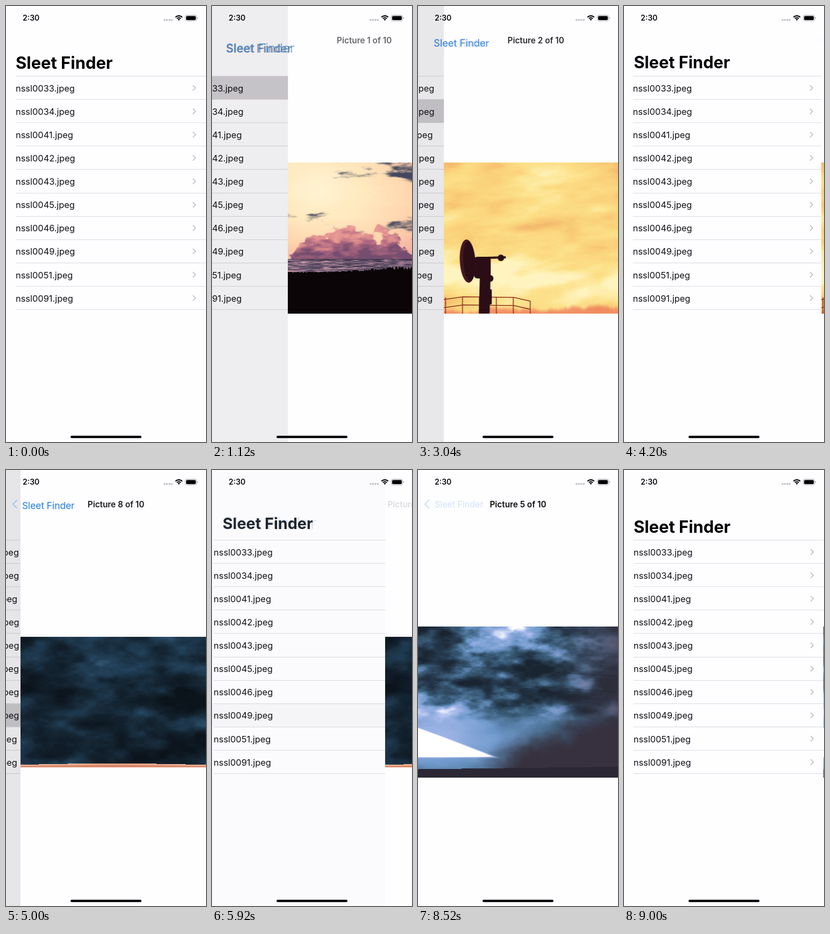
These frames come from a looping animation (372 by 805 pixels, 9040 ms). An HTML page with a canvas:

```html
<!DOCTYPE html>
<html lang="en">
<head>
<meta charset="utf-8">
<title>Picture list</title>
<style>
html, body { margin: 0; width: 100%; height: 100%; overflow: hidden; background: #fefdff; }
canvas { display: block; width: 372px; height: 805px; }
</style>
</head>
<body>
<canvas id="stage"></canvas>
<script>
const W = 372, H = 805, LOOP = 9040, STEP = 40;
const PAPER = '#fefdff', BLUE = '#157bea', APP = 'Sleet Finder';
const FILES = ['0033', '0034', '0041', '0042', '0043', '0045', '0046', '0049', '0051', '0091'];
const ROW_TOP = 129, ROW_H = 43.1;

const stage = document.getElementById('stage');
const scale = window.devicePixelRatio || 1;
stage.width = W * scale;
stage.height = H * scale;
const ctx = stage.getContext('2d');

const mix = (a, b, k) => a + (b - a) * k;
const clamp = v => Math.max(0, Math.min(1, v));
const smooth = v => (v = clamp(v), v * v * (3 - 2 * v));

// ---- fields and colours for the pictures ----
function hash(x, y) {
  const v = Math.sin(x * 127.1 + y * 311.7) * 43758.5453;
  return v - Math.floor(v);
}

function noise(x, y) {
  const i = Math.floor(x), j = Math.floor(y), u = smooth(x - i), v = smooth(y - j);
  return mix(mix(hash(i, j), hash(i + 1, j), u), mix(hash(i, j + 1), hash(i + 1, j + 1), u), v);
}

// Fractal noise around zero, roughly -0.5 to 0.5.
function cloud(x, y) {
  let sum = 0;
  for (let o = 0, size = 1; o < 5; o++, size *= 2) sum += (noise(x * size + o * 17, y * size) - 0.5) / size;
  return sum;
}

const bell = (d, r) => Math.exp(-((d / r) ** 2));
const blend = (a, b, k) => a.map((v, i) => mix(v, b[i], k));
const rgb = hex => [1, 3, 5].map(i => parseInt(hex.slice(i, i + 2), 16));

function ramp(...hexes) {
  const stops = hexes.map(rgb), last = stops.length - 1;
  return k => {
    const at = clamp(k) * last, i = Math.min(Math.floor(at), last - 1);
    return blend(stops[i], stops[i + 1], at - i);
  };
}

function picture(height, shade, details) {
  const image = document.createElement('canvas');
  image.width = W;
  image.height = height;
  const g = image.getContext('2d'), data = g.createImageData(W, height);
  for (let y = 0, n = 0; y < height; y++) {
    for (let x = 0; x < W; x++, n += 4) data.data.set([...shade(x, y), 255], n);
  }
  g.putImageData(data, 0, 0);
  if (details) details(g);
  return { image, height, top: Math.round(428 - height / 2) };
}

function line(g, color, width, points) {
  g.strokeStyle = color;
  g.lineWidth = width;
  g.beginPath();
  points.forEach(p => g.lineTo(...p));
  g.stroke();
}

function rect(g, color, x, y, w, h, radius = 0) {
  g.fillStyle = color;
  g.beginPath();
  g.roundRect(x, y, w, h, radius);
  g.fill();
}

function oval(g, color, x, y, rx, ry) {
  g.fillStyle = color;
  g.beginPath();
  g.ellipse(x, y, rx, ry, -0.06, 0, 7);
  g.fill();
}

// ---- pictures ----
const sunsetSky = ramp('#fff3d2', '#ffe8be', '#ffd2ac', '#f1a6a2', '#a77f9e');
const cumulus = ramp('#f4a99a', '#e0908f', '#a8657e', '#754d6e');
const sea = ramp('#42374c', '#756179', '#d69aa4');
const slate = rgb('#43485f'), land = rgb('#0b0508');

const sunset = picture(279, (x, y) => {
  const grass = 202 - 6 * bell(x - 215, 90) - 8 * noise(x / 2, 3) * bell(x - 230, 120) + x / 90;
  if (y > grass) return land;
  if (y > 177) return sea(0.55 - x / 1500 + 0.9 * cloud(x / 14, y / 1.5) - 0.4 * bell(y - 177, 3));
  let color = sunsetSky(Math.hypot((x - 60) / 360, (y - 50) / 220) + 0.08 * cloud(x / 60, y / 25));
  const dark = bell(x - 290, 85) * bell(y - 16 + (x - 290) / 14, 19);
  color = blend(color, slate, smooth((dark + cloud(x / 50, y / 16) - 0.3) * 2.5));
  const heap = 42 * bell(x - 90, 48) + 26 * bell(x - 178, 30) + 34 * bell(x - 285, 42) + 12 * bell(x - 372, 50);
  const edge = 159 - heap - 42 * cloud(x / 24, y / 20);
  return blend(color, cumulus((y - 118 + x / 12) / 66 + 0.5 * cloud(x / 18, y / 8)), smooth((y - edge) / 7));
});

const goldSky = ramp('#f0ae68', '#fad079', '#fce18a', '#fff4bf');
const ember = rgb('#f0805c');

const dish = picture(279, (x, y) => {
  const corner = bell(x - 320, 80) * bell(y, 45), haze = bell(y - 212, 34);
  const color = goldSky(0.55 + 0.75 * cloud(x / 95, y / 34 + x / 300) + 0.3 * haze - 0.5 * corner);
  return blend(color, ember, 0.8 * smooth((y - 268 + 16 * cloud(x / 40, 1)) / 11));
}, g => {
  const dark = '#2b0d16', rail = '#8f321e';
  for (const drop of [0, 15]) line(g, rail, 1.6, [[0, 253 + drop], [35, 248 + drop], [130, 249 + drop], [161, 256 + drop]]);
  for (let x = 3; x < 165; x += 31.5) line(g, rail, 1.6, [[x, x > 140 ? 256 : 249], [x, 279]]);
  line(g, dark, 20, [[77, 200], [75, 279]]);
  rect(g, dark, 66, 234, 23, 28, 2);
  rect(g, dark, 56, 174, 31, 40, 6);
  line(g, dark, 4, [[80, 176], [115, 175]]);
  oval(g, dark, 106, 176, 6, 6);
  oval(g, dark, 87, 214, 5, 6);
  oval(g, '#431722', 44, 182, 14.5, 40);
  oval(g, dark, 47, 182, 11, 37);
});

const nightSky = ramp('#0b131b', '#142431', '#22415a', '#4b6f93');
const duskStrip = ramp('#f3bfa0', '#d98768');

const night = picture(241, (x, y) => {
  const ground = 236 - 3 * bell(x - 170, 130);
  if (y > ground) return duskStrip((y - ground) / 4);
  return nightSky(0.3 + 0.8 * cloud(x / 75, y / 40) + 0.3 * bell(x - 50, 80) * bell(y - 10, 60) + 0.25 * bell(y - 160, 25));
});

const stormSky = ramp('#1a2531', '#263a4e', '#3d617f', '#7099cb', '#a5b9ea', '#ffffff');
const gloom = rgb('#37313f'), field = rgb('#2b2735');

const storm = picture(279, (x, y) => {
  if (y > 263 - x / 80) return field;
  const texture = cloud(x / 52, y / 26) * (1 - 0.9 * smooth((y - 140) / 50));
  const glow = 0.42 * bell(x - 165, 50) * bell(y - 8, 25) + 0.5 * bell(x, 210) * bell(y - 205, 75);
  const gap = smooth(Math.min(y - 188 - x * 0.37, 240 - y) / 9 + 0.4);
  const color = stormSky(0.28 + 0.75 * texture + glow + gap);
  const slope = (y - 265 + (x - 110) * 0.42) / 60 + 0.5 + 0.4 * cloud(x / 40, y / 30);
  const shadow = Math.max(smooth(slope) * smooth((x - 85) / 110), 0.75 * smooth((x - 220) / 170));
  return blend(color, gloom, shadow * (1 - gap));
}, g => {
  for (const y of [68, 97]) line(g, '#16202c88', 0.8, [[0, y], [W, y + 24]]);
});

const VISITS = [
  { row: 0, photo: sunset, push: 1000, tap: 1880, pop: 1955 },
  { row: 1, photo: dish, push: 2840, tap: 3760, pop: 3855 },
  { row: 7, photo: night, push: 4760, tap: 5600, pop: 5727 },
  { row: 4, photo: storm, push: 6520, tap: 8440, pop: 8554 }
];

// Critically damped spring: the share of the way still to go.
function remaining(ms) {
  if (ms <= 0) return 1;
  if (ms >= 490) return 0;
  const k = Math.sqrt(1000 / 3) * ms / 1000;
  return (1 + k) * Math.exp(-k);
}

// ---- interface ----
function text(str, x, y, size, weight, color, alpha = 1, align = 'left') {
  ctx.globalAlpha = alpha;
  ctx.font = `${weight} ${size}px Inter, "Liberation Sans", sans-serif`;
  ctx.textAlign = align;
  ctx.fillStyle = color;
  ctx.fillText(str, x, y);
  ctx.globalAlpha = 1;
}

// An angle mark with its tip at x, y; reach is signed.
function chevron(color, width, x, y, reach) {
  const size = Math.abs(reach);
  line(ctx, color, width, [[x - reach, y - size], [x, y], [x - reach, y + size]]);
}

function drawList(shift, row, glow) {
  ctx.save();
  ctx.translate(shift, 0);
  ctx.globalAlpha = glow;
  rect(ctx, '#d2d0d4', 0, ROW_TOP + row * ROW_H, W - shift, ROW_H);
  ctx.globalAlpha = 1;
  for (let i = 0; i <= FILES.length; i++) {
    rect(ctx, '#dcdadd', 18, Math.round(ROW_TOP + i * ROW_H), W - 18 - shift, 1);
  }
  FILES.forEach((id, i) => {
    const y = ROW_TOP + i * ROW_H;
    text(`nssl${id}.jpeg`, 18, y + 28.7, 16.4, 400, '#111014');
    chevron('#c2c1c5', 1.7, 352.5, y + 22.3, 5);
  });
  ctx.restore();
}

function drawBar(open, visit, pushing, tapped) {
  const grow = mix(191 / 92, 1, open), x = mix(18, 31, open), y = mix(115.8, 68.5, open);
  const press = tapped ? 0.2 : 1;
  text(APP, x, y, 14.9 * grow, 700, '#000', 1 - open);
  if (!open) return;
  text(APP, x, y, 16 * grow, 400, BLUE, open * press);
  ctx.globalAlpha = clamp((open - 0.9) * 10) * press;
  chevron(BLUE, 2.3, 13, 63, -7.5);
  const slide = (1 - open) * (pushing ? 256 : 223);
  text(`Picture ${visit.row + 1} of 10`, 186 + slide, 68.5, 15.3, 600, '#0b0a0d', open, 'center');
}

function drawStatus() {
  text('2:30', 31, 27.3, 14, 600, '#0b0a0d');
  for (let i = 0; i < 4; i++) rect(ctx, '#c6c5c9', 293.2 + i * 4.5, 24, 3.4, 3.4, 1.2);
  ctx.strokeStyle = '#000';
  for (let r = 1.5; r < 10; r += 3.7) {
    ctx.lineWidth = r < 2 ? 3 : 2.1;
    ctx.beginPath();
    ctx.arc(321.5, 27, r, -Math.PI * 0.75, -Math.PI * 0.25);
    ctx.stroke();
  }
  ctx.strokeStyle = '#a5a4a8';
  ctx.lineWidth = 1;
  ctx.beginPath();
  ctx.roundRect(333.5, 17, 21, 10.5, 3);
  ctx.stroke();
  rect(ctx, '#000', 335, 18.5, 18, 7.5, 1.8);
  rect(ctx, '#a5a4a8', 355.6, 20.5, 1.3, 3.6, 0.6);
  rect(ctx, '#000', 120, 793.4, 132, 4.4, 2.2);
}

function draw(t) {
  const visit = VISITS.findLast(v => t >= v.push);
  const pushing = !!visit && t < visit.pop;
  const tapped = pushing && t >= visit.tap;
  const open = !visit ? 0 : pushing ? 1 - remaining(t - visit.push - 5) : remaining(t - visit.pop);

  ctx.setTransform(scale, 0, 0, scale, 0, 0);
  rect(ctx, PAPER, 0, 0, W, H);
  drawList(-112 * open, visit ? visit.row : 0, pushing ? 1 : open);
  if (open) {
    const x = W * (1 - open), { image, top, height } = visit.photo;
    rect(ctx, `rgba(0,0,0,${0.1 * open})`, 0, 0, W, H);
    rect(ctx, PAPER, x, 0, W, H);
    ctx.drawImage(image, x, top, W, height);
  }
  drawBar(open, visit, pushing, tapped);
  drawStatus();
}

const start = performance.now();
function tick() {
  const t = (performance.now() - start) % LOOP;
  draw(Math.floor(t / STEP) * STEP);
  requestAnimationFrame(tick);
}
tick();
</script>
</body>
</html>
```
